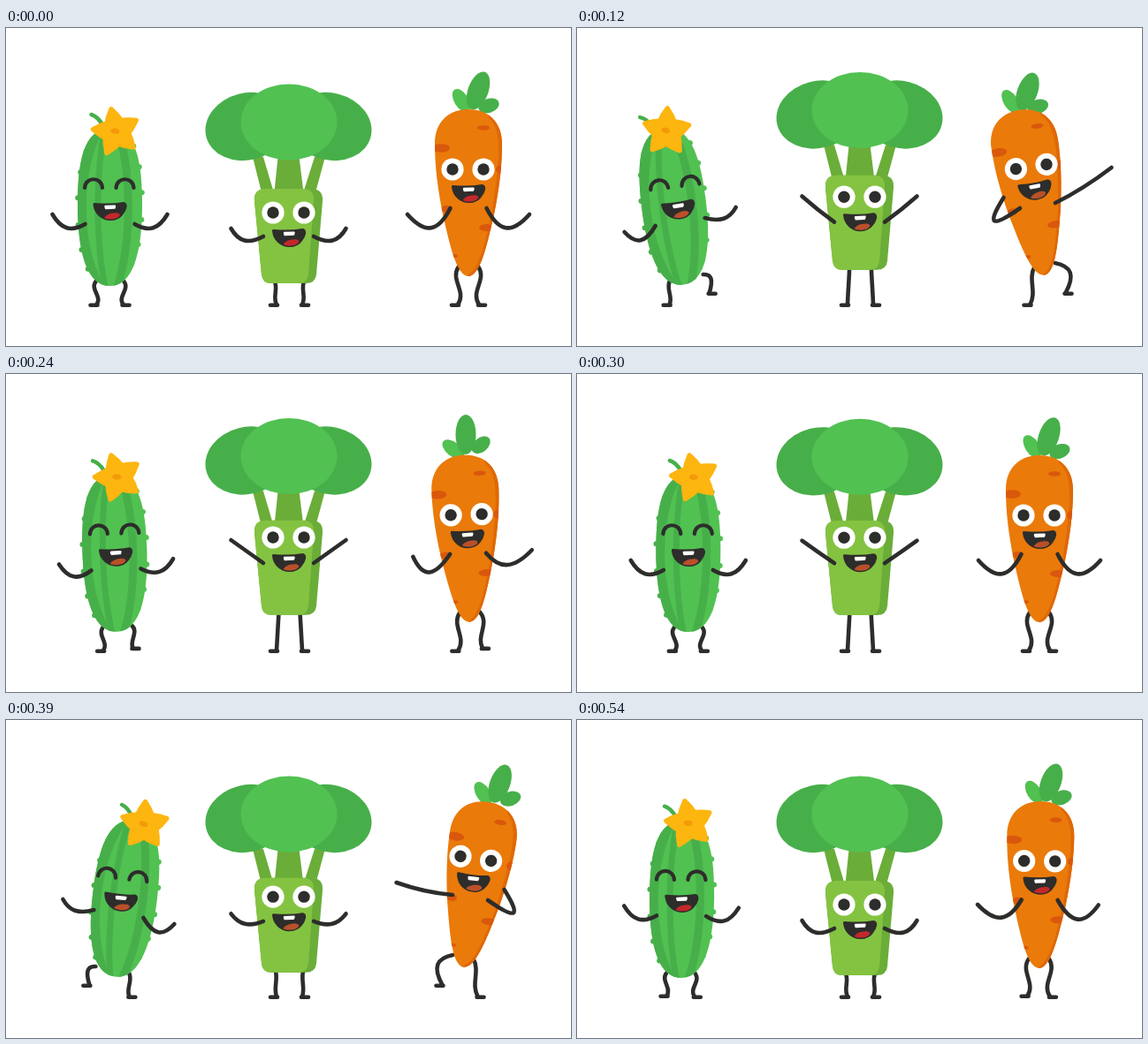
Write an HTML page with a canvas that moves like this. It is 639x360 px and loops after 0.57 s.

```html
<!DOCTYPE html>
<html lang="en">
<head>
<meta charset="utf-8">
<title>Dancing vegetables</title>
<style>
html, body { margin: 0; height: 100%; overflow: hidden; background: #fff; }
canvas { display: block; }
</style>
</head>
<body>
<canvas id="stage" width="639" height="360"></canvas>
<script>
const g = document.getElementById('stage').getContext('2d');
const LOOP = 570, STEP = 30, DEG = Math.PI / 180;
const INK = '#2d2d2b', LIGHT = '#51c151', DARK = '#47af4a';

// Timing
function ease(t, from, to) {
  const k = Math.min(1, Math.max(0, (t - from) / (to - from)));
  return k * k * (3 - 2 * k);
}
const hold = (t, a, b, c, d) => ease(t, a, b) - ease(t, c, d);
const swing = t => hold(t, 15, 105, 160, 275);

function poseAt(t) {
  const sway = swing(t - LOOP / 2) - swing(t);
  const flick = Math.exp(-(((t - 240) / 35) ** 2));
  return {
    sway,
    bend: Math.abs(sway),
    drift: -4.2 * Math.cos(2 * Math.PI * t / LOOP),
    leafTurn: -20 * flick,
    flowerTurn: -12 + 14 * Math.abs(sway) - 8 * flick,
    hop: hold(t, 10, 140, 290, 430),
    crownHop: hold(t, 0, 115, 285, 385),
    faceHop: hold(t, 20, 170, 290, 460)
  };
}

// Drawing helpers
function fill(color, path) {
  g.fillStyle = color;
  g.fill(new Path2D(path));
}
function line(path, width = 4.6, color = INK) {
  g.strokeStyle = color;
  g.lineWidth = width;
  g.lineCap = g.lineJoin = 'round';
  g.stroke(new Path2D(path));
}
function oval(color, x, y, rx, ry = rx, turn = 0) {
  g.fillStyle = color;
  g.beginPath();
  g.ellipse(x, y, rx, ry, turn, 0, 7);
  g.fill();
}
function group(x, y, degrees, draw) {
  g.save();
  g.translate(x, y);
  g.rotate(degrees * DEG);
  draw();
  g.restore();
}
function clipped(path, draw) {
  g.save();
  g.clip(path);
  draw();
  g.restore();
}

// Draws both sides; swaying away from a side raises its limbs, towards it lowers them.
function mirrored(x, sway, draw) {
  for (const side of [-1, 1]) {
    g.save();
    g.translate(x, 0);
    g.scale(side, 1);
    draw(Math.max(0, -side * sway), Math.max(0, side * sway), side);
    g.restore();
  }
}
// A curve bowed by (bx, by); flip -1 turns the bow into an S.
function limb(x1, y1, x2, y2, bx, by, flip = 1) {
  const dx = x2 - x1, dy = y2 - y1;
  line(`M${x1} ${y1}C${[
    x1 + .35 * dx + bx, y1 + .35 * dy + by,
    x1 + .65 * dx + bx * flip, y1 + .65 * dy + by * flip, x2, y2]}`);
}
function leg(x1, y1, x2, y2, bx, by, flip) {
  limb(x1, y1, x2, y2, bx, by, flip);
  line(`M${x2 - 1} ${y2 + .8}h8`);
}

function mouth(x, y, tongue) {
  group(x, y, 0, () => {
    const lips = new Path2D('M-17-7.5Q2-6 16-8.5C20-8 18-1 14 3.5C10 9 5 9.5 1 9.5C-8 9.5-16 3-17-7.5Z');
    g.fillStyle = INK;
    g.fill(lips);
    line('M-17-7.5Q2-6 16-8.5C20-8 18-1 14 3.5C10 9 5 9.5 1 9.5C-8 9.5-16 3-17-7.5Z', 3);
    clipped(lips, () => oval(tongue, 3, 6.5, 9, 3.8, -.25));
    line('M-4.5-5L6-5.4L5.5-3.4L-4-3Z', 2.4, '#fff');
  });
}
function roundEyes(x, y) {
  for (const side of [-17.5, 17.5]) {
    oval('#fff', x + side, y, 12.6);
    oval(INK, x + side, y, 6.7);
  }
}

function flower(turn) {
  group(7, -174.5, turn, () => {
    for (let i = 0; i < 5; i++) {
      fill('#fdb50f', 'M0 4L-12-10Q-8-20-2-28Q0-30 2-28Q8-20 12-10Z');
      g.rotate(72 * DEG);
    }
    oval('#fdb50f', 0, 0, 13.5);
    oval('#f39a08', -1, -1, 5, 3.2, .3);
  });
}

function cucumber(p, tongue) {
  const s = p.sway, x = 121.7 + p.drift;
  mirrored(x, s, (up, down) =>
    leg(16 + 6 * up, 287 - 8 * up, 15 + 14 * up + down, 313 - 13 * up, 7 - 3 * down, -8 * up, 2 * up - 1));

  group(x, 292 - 1.5 * p.bend, 7 * s, () => {
    const body = new Path2D('M0 0C-30 0-36.5-50-36.5-92C-36.5-140-30-178 0-178C30-178 36.5-140 36.5-92C36.5-50 30 0 0 0Z');
    for (let i = 0; i < 6; i++) {
      const a = (-50 + i * 21) * DEG, c = 36.5 * Math.cos(a) ** .7, y = 84 * Math.sin(a);
      oval(DARK, -c, y - 88, 3);
      oval(LIGHT, c, y - 94, 3);
    }
    g.fillStyle = LIGHT;
    g.fill(body);
    clipped(body, () => {
      for (const [edge, width] of [[-32, 13], [-13, 7], [20, 9]])
        line(`M${edge * .4}-180C${edge * 1.25}-130 ${edge * 1.25}-50 ${edge * .4} 2`, width, DARK);
    });
    group(5 * s, 0, 0, () => {
      line('M-21-194Q-14-192-8-182', 4.5, DARK);
      flower(p.flowerTurn - 7 * s);
    });
    group(-4.5 * s, 0, 0, () => {
      for (const eye of [-18.5, 17]) line(`M${eye - 10}-111c1-13 19-13 20 0`, 4.2);
      mouth(-.5, -85, tongue);
    });
  });

  mirrored(x, s, (up, down) =>
    limb(28 - 4 * up + 4 * down, 222 - 7 * up + 2 * down, 65 - 6 * up + 2 * down, 211 - 8 * up + 20 * down,
      3 + 2 * up - 4 * down, 13 - 4 * up + 4 * down));
}

function broccoli(p, tongue) {
  const low = 1 - p.hop;
  mirrored(320.5, 0, () =>
    leg(12 + 5 * low, 270 + 16 * low, 14.5, 313, -4 * low, 0, -1));

  group(0, -13.5 * p.crownHop, 0, () => {
    fill('#6aad38', 'M278 142L291 146L304 190H290ZM308 142H331L337 190H303ZM362 142L349 146L335 190H349Z');
    mirrored(319.5, 0, () => oval(DARK, 47, 111.5, 47.5, 38, .25));
    oval(LIGHT, 320, 106.5, 54.5, 43);
  });
  group(0, -16.3 * p.hop, 0, () => {
    fill('#6aad38', 'M294 182H345Q359 182 358 196L351 279Q350 289 339 289H300Q290 289 289 279L281 196Q280 182 294 182Z');
    fill('#84c341', 'M294 182H336Q349 182 348 196L342 279Q341 289 331 289H300Q290 289 289 279L281 196Q280 182 294 182Z');
  });
  group(0, -24 * p.faceHop, 0, () => {
    roundEyes(319.5, 209);
    mouth(319.5, 237, tongue);
  });

  mirrored(319.5, 0, () =>
    limb(28.5, 236 - 22 * p.faceHop, 65, 227 - 39 * p.hop, 4 * low, 12 * low));
}

function carrot(p, tongue) {
  const s = p.sway, x = 523 - 5.5 * s, tilt = 8.5 * s;
  mirrored(x, s, (up, down) =>
    leg(11 + up, 270 - 4 * up, 12 + 12 * up + 4 * down, 313 - 13 * up, 10 + 5 * up - 4 * down, -8 * up, 2 * up - 1));

  group(x, 281 - 1.3 * p.bend, tilt, () => {
    group(2.5 * s, -187, p.leafTurn - tilt, () => {
      oval(LIGHT, -8, -12, 8, 14.5, -.55);
      oval(DARK, 23, -6, 12, 8, -.35);
      oval(DARK, 11, -23, 11.5, 22.5, .35);
    });
    const body = new Path2D('M0 0C-14 0-22-40-29-70C-35-100-38-125-38-150C-38-175-22-189 0-189C22-189 38-175 38-150C38-125 35-100 29-70C22-40 14 0 0 0Z');
    g.fillStyle = '#ea7a0a';
    g.fill(body);
    clipped(body, () => {
      line('M28-182C46-165 40-125 32-72C25-40 18-6 4 2', 11, '#df6808');
      for (const spot of [[17, -168, 7, 2.8], [-31, -145, 10, 4.8], [37, -121, 6, 5], [-25, -76, 6, 4], [21, -55, 9, 4], [-17, -23, 5, 2]])
        oval('#d9580c', ...spot);
    });
    group(-4 * s, -2.5 * p.bend, 0, () => {
      roundEyes(-.5, -121);
      mouth(-.5, -94, tongue);
    });
  });

  mirrored(x, s, (up, down, side) =>
    limb(20.5 - 8 * up + 7 * down, 204 - 6 * up, 69 + 7 * up - 23 * down, 211 - (40 + 13 * side) * up - 19 * down,
      -3 + 3 * up + 29 * down, 25 - 22 * up + 2 * down));
}

function render(now) {
  const t = Math.floor(now % LOOP / STEP) * STEP;
  const pose = poseAt(t);
  const tongue = t < 60 || t > 500 ? '#c3282c' : '#b9502a';
  g.fillStyle = '#fff';
  g.fillRect(0, 0, 639, 360);
  for (const dancer of [cucumber, broccoli, carrot]) dancer(pose, tongue);
}

const start = performance.now();
(function tick() {
  render(performance.now() - start);
  requestAnimationFrame(tick);
})();
</script>
</body>
</html>
```
